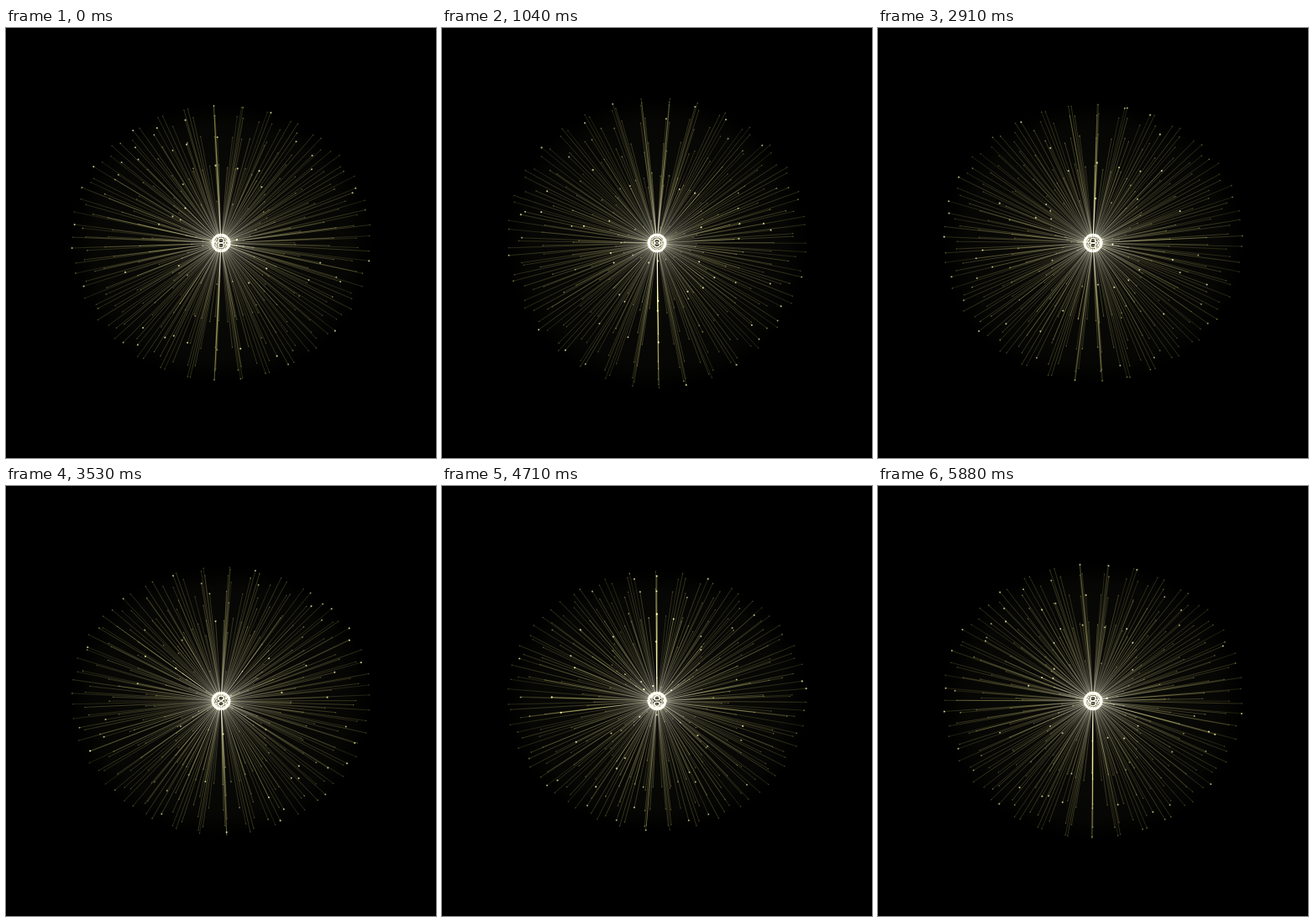
Write an HTML page with a canvas that moves like this. It is 512 px wide and 512 px high and loops after 5950 ms.

```html
<!DOCTYPE html>
<html lang="en">
<head>
<meta charset="utf-8">
<title>Spinning burst</title>
<style>
  html, body { margin: 0; width: 100%; height: 100%; overflow: hidden; background: #000; }
  canvas { display: block; width: 512px; height: 512px; }
</style>
</head>
<body>
<canvas id="stage" width="512" height="512"></canvas>
<script>
const ctx = document.getElementById('stage').getContext('2d');
const LOOP = 5950, STEPS = 86, TAU = Math.PI * 2, DEG = Math.PI / 180;
const CENTER = 256, RADIUS = 179, HEIGHT = 100, CORE = 0.06;
const SPOKES = 33, RINGS = 10;

let seed = 7;
function random() {
  seed = (seed * 16807) % 2147483647;
  return seed / 2147483647;
}

// Rays end on the meridians and parallels of a flattened sphere.
const rays = [];
for (let i = 0; i < SPOKES; i++) {
  for (let j = 0; j < RINGS; j++) {
    const lat = (-72 + 16 * j + (random() - 0.5) * 3) * DEG;
    rays.push({
      angle: (i * 360 / SPOKES + (random() - 0.5) * 0.8) * DEG,
      r: RADIUS * Math.cos(lat),
      z: HEIGHT * Math.sin(lat),
      glow: 0.6 + random() * 0.4,
      phase: random(),
      pulse: 1 + Math.floor(random() * 4)
    });
  }
}

function radial(radius, stops) {
  const g = ctx.createRadialGradient(0, 0, 0, 0, 0, radius);
  for (const [at, color] of stops) g.addColorStop(at, color);
  return g;
}

const lineColor = radial(RADIUS, [
  [0, 'rgb(34,34,30)'], [0.08, 'rgb(38,38,33)'], [0.2, 'rgb(48,47,38)'],
  [0.4, 'rgb(56,55,34)'], [0.8, 'rgb(52,51,28)'], [1, 'rgb(42,42,20)']
]);
const haze = radial(RADIUS, [
  [0, 'rgb(24,24,21)'], [0.25, 'rgb(10,10,7)'], [0.85, 'rgb(6,6,4)'], [1, 'rgb(0,0,0)']
]);

function disc(x, y, r) {
  ctx.beginPath();
  ctx.arc(x, y, r, 0, TAU);
  ctx.fill();
}

function draw(t) {
  const swing = Math.cos((t - 22 / STEPS) * TAU);
  const spin = (-1.6 + 32.2 * swing) * DEG;
  const tilt = (27.5 - 10.5 * swing) * DEG;
  const squash = Math.cos(tilt), lift = Math.sin(tilt);

  ctx.setTransform(1, 0, 0, 1, 0, 0);
  ctx.globalCompositeOperation = 'source-over';
  ctx.globalAlpha = 1;
  ctx.fillStyle = '#000';
  ctx.fillRect(0, 0, 512, 512);
  ctx.translate(CENTER, CENTER);
  ctx.globalCompositeOperation = 'lighter';

  ctx.save();
  ctx.scale(1, Math.hypot(squash, lift * HEIGHT / RADIUS));
  ctx.fillStyle = haze;
  disc(0, 0, RADIUS);
  ctx.restore();

  ctx.strokeStyle = lineColor;
  ctx.lineWidth = 1;
  for (const ray of rays) {
    const s = Math.sin(ray.angle + spin), c = Math.cos(ray.angle + spin);
    const x = ray.r * s * (1 + 0.03 * c * ray.r / RADIUS);
    const y = -ray.r * c * squash - ray.z * lift;
    ctx.globalAlpha = ray.glow;
    ctx.beginPath();
    ctx.moveTo(x * CORE, y * CORE);
    ctx.lineTo(x, y);
    ctx.stroke();

    const spark = (0.5 + 0.5 * Math.sin((t * ray.pulse + ray.phase) * TAU)) ** 8;
    ctx.globalAlpha = 0.35 + 0.45 * spark;
    ctx.fillStyle = spark > 0.6 ? '#dedc9c' : '#a8a65a';
    disc(x, y, 0.75 + 0.35 * spark);
    ctx.globalAlpha = 0.3;
    ctx.fillStyle = '#fffbdc';
    disc(x * CORE, y * CORE, 0.8);
  }

  ctx.globalAlpha = 1;
  ctx.strokeStyle = 'rgba(255,253,225,.45)';
  ctx.lineWidth = 2.5;
  ctx.beginPath();
  ctx.arc(0, 0, 10, 0, TAU);
  ctx.stroke();
}

function frame(now) {
  draw(Math.floor((now % LOOP) / LOOP * STEPS) / STEPS);
  requestAnimationFrame(frame);
}
draw(0);
requestAnimationFrame(frame);
</script>
</body>
</html>
```
